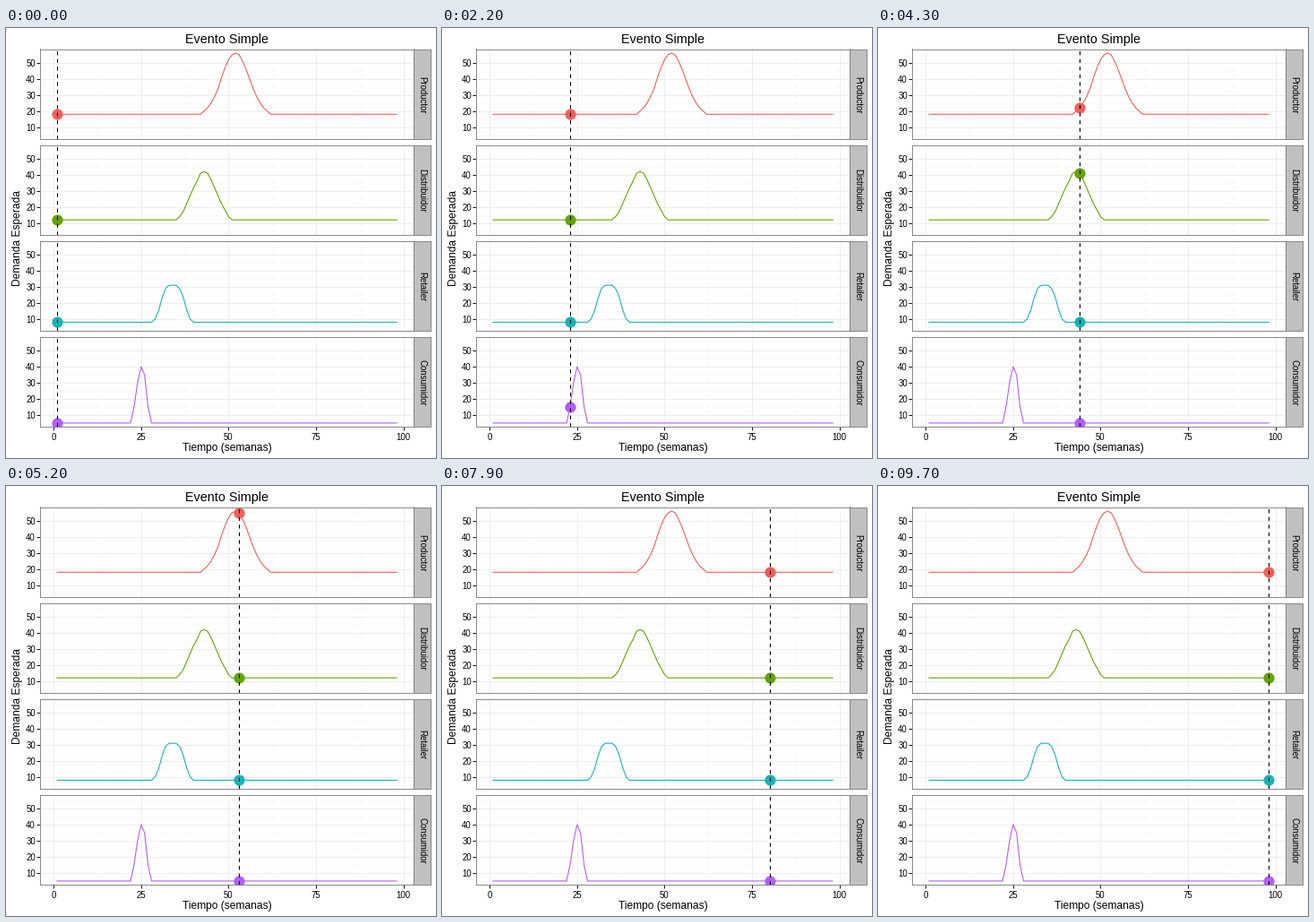
These frames come from a looping animation (480 px wide and 480 px high, 9.8 s). A matplotlib script:

```python
import matplotlib.pyplot as plt
import numpy as np
from matplotlib.animation import FuncAnimation
from matplotlib.patches import Rectangle
from matplotlib.ticker import MultipleLocator

SIZE, DPI = 480, 72
WEEKS = np.arange(1, 99)
LEFT, RIGHT, STRIP_RIGHT = 38, 455, 474
TOP, HEIGHT, PITCH = 23.5, 100.7, 107.1
BORDER, STRIP = "#7f7f7f", "#c0c0c0"

# name, colour, base demand, first week of the pulse, pulse values
SERIES = [
    ("Productor", "#F35E5A", 18, 43,
     [20, 22, 25, 29, 34, 41, 47, 52, 55, 56,
      55, 51, 46, 40, 34, 29, 25, 22, 20]),
    ("Distribuidor", "#64A300", 12, 36,
     [14, 17, 22, 27, 32, 36, 41, 42, 41, 37, 32, 27, 22, 18, 14]),
    ("Retailer", "#17B3B7", 8, 29,
     [10, 15, 23, 29, 31, 31, 31, 29, 24, 16, 10]),
    ("Consumidor", "#B35DFF", 5, 23, [15, 30, 40, 35, 15]),
]

plt.rcParams["font.family"] = "Liberation Sans"
fig = plt.figure(figsize=(SIZE / DPI, SIZE / DPI), dpi=DPI, facecolor="white")


def label(x, y, text, size, **kw):
    """Place text at pixel coordinates measured from the top left."""
    fig.text(x / SIZE, 1 - y / SIZE, text, fontsize=size, ha="center", **kw)


def demand(base, start, pulse):
    values = np.full(len(WEEKS), float(base))
    values[start - 1:start - 1 + len(pulse)] = pulse
    return values


def make_panel(row):
    top = TOP + row * PITCH
    y0 = 1 - (top + HEIGHT) / SIZE
    ax = fig.add_axes([LEFT / SIZE, y0, (RIGHT - LEFT) / SIZE, HEIGHT / SIZE])
    ax.set_xlim(-3.85, 102.85)
    ax.set_ylim(2.45, 58.55)
    ax.xaxis.set_major_locator(MultipleLocator(25))
    ax.xaxis.set_minor_locator(MultipleLocator(12.5))
    ax.yaxis.set_major_locator(MultipleLocator(10))
    ax.yaxis.set_minor_locator(MultipleLocator(5))
    ax.set_axisbelow(True)
    ax.grid(which="minor", color="#f8f8f8", lw=0.8)
    ax.grid(which="major", color="#e4e4e4", lw=0.6)
    ax.tick_params(which="minor", length=0)
    ax.tick_params(which="major", length=4, width=0.9, labelsize=9.6)
    ax.tick_params(axis="y", pad=1)
    ax.tick_params(axis="x", pad=2.5)
    if row < len(SERIES) - 1:
        ax.tick_params(axis="x", length=0, labelbottom=False)
    for spine in ax.spines.values():
        spine.set(color=BORDER, linewidth=0.9)

    fig.add_artist(Rectangle(
        (RIGHT / SIZE, y0), (STRIP_RIGHT - RIGHT) / SIZE, HEIGHT / SIZE,
        transform=fig.transFigure, facecolor=STRIP, edgecolor=BORDER, lw=0.9))
    label(464, top + HEIGHT / 2 + 0.5, SERIES[row][0], 9.6,
          va="center", rotation=-90)
    return ax


tracks = []
for row, (name, color, base, start, pulse) in enumerate(SERIES):
    ax = make_panel(row)
    values = demand(base, start, pulse)
    ax.plot(WEEKS, values, color=color, lw=1.1, zorder=2)
    dot, = ax.plot([], [], "o", color=color, ms=12.2, mew=0, zorder=2.2)
    cursor = ax.axvline(1, color="black", lw=1.07, ls=(0, (4, 4)), zorder=2.3)
    tracks.append((values, dot, cursor))

label(246.5, 17, "Evento Simple", 14.4, va="baseline")
label(246.5, 472, "Tiempo (semanas)", 12, va="baseline")
label(13, 235, "Demanda Esperada", 12, va="center", rotation=90)


def update(i):
    week = WEEKS[i]
    for values, dot, cursor in tracks:
        dot.set_data([week], [values[i]])
        cursor.set_xdata([week, week])
    return [artist for track in tracks for artist in track[1:]]


anim = FuncAnimation(fig, update, frames=len(WEEKS), interval=100,
                     repeat=True, repeat_delay=0)
plt.show()
```
